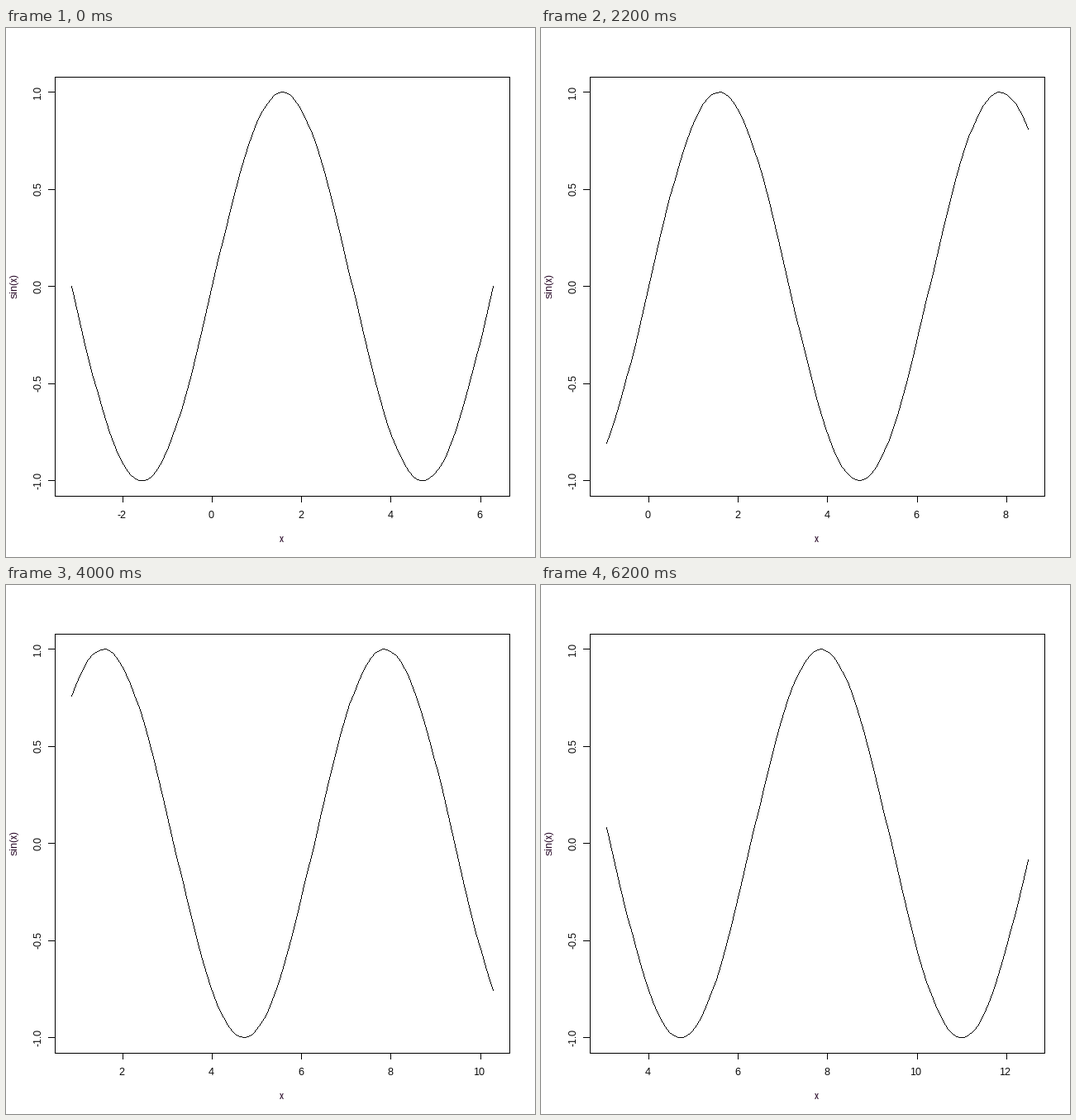
Animation of 640x640 px, one loop 6.3 s. Source, as a matplotlib script:

```python
import math

import numpy as np
import matplotlib.pyplot as plt
from matplotlib.animation import FuncAnimation
from matplotlib.collections import PolyCollection

SIZE = 640
FRAMES = 63
LEFT, RIGHT = 59.04, 609.76
TOP, BOTTOM = 59.04, 566.56
TICK = 7.2
FONT_PT = 8.64
BLACK = "#000000"
TITLE = "#200020"

plt.rcParams.update({
    "font.family": "Liberation Sans",
    "font.size": FONT_PT,
    "text.hinting": "native",
    "text.hinting_factor": 1,
})

fig = plt.figure(figsize=(6.4, 6.4), dpi=100, facecolor="white")
ax = fig.add_axes([0, 0, 1, 1])
ax.set_xlim(0, SIZE)
ax.set_ylim(SIZE, 0)
ax.axis("off")

# Every line is made of whole pixels, so all strokes share one collection.
ink = PolyCollection([], facecolors=BLACK, edgecolors="none", linewidths=0,
                     antialiaseds=False)
ax.add_collection(ink, autolim=False)


def label(text="", x=0, y=0, rotation=0, color=BLACK):
    return ax.text(x, y, text, ha="center", va="baseline", color=color,
                   rotation=rotation, rotation_mode="anchor")


label("x", 333.4, 622, color=TITLE)
label("sin(x)", 13.4, 312.3, rotation=90, color=TITLE)

y_ticks = [-1.0, -0.5, 0.0, 0.5, 1.0]
x_labels = [label() for _ in range(6)]
y_labels = [label(f"{v:.1f}", rotation=90) for v in y_ticks]


def bar(x0, y0, x1, y1):
    """Filled block covering the given pixels, both ends included."""
    x0, y0 = int(x0), int(y0)
    x1, y1 = int(x1) + 1, int(y1) + 1
    return [(x0, y0), (x1, y0), (x1, y1), (x0, y1)]


def trace(px, py):
    """Pixels of a hard-edged polyline through whole-pixel points."""
    points = np.column_stack([px, py]).astype(int)
    parts = []
    for a, b in zip(points[:-1], points[1:]):
        n = max(1, np.abs(b - a).max())
        t = np.arange(n + 1)[:, None] / n
        parts.append(np.floor(a + t * (b - a) + 0.5))
    return np.unique(np.concatenate(parts).astype(int), axis=0)


def padded(lo, hi):
    margin = 0.04 * (hi - lo)
    return lo - margin, hi + margin


BOX = [
    bar(LEFT, TOP, RIGHT, TOP),
    bar(LEFT, BOTTOM, RIGHT, BOTTOM),
    bar(LEFT, TOP, LEFT, BOTTOM),
    bar(RIGHT, TOP, RIGHT, BOTTOM),
]
CORNERS = np.array([(0, 0), (1, 0), (1, 1), (0, 1)])


def draw(frame):
    start = -math.pi + 0.1 * frame
    x = np.linspace(start, start + 3 * math.pi, 101)
    y = np.sin(x)
    x_lo, x_hi = padded(x[0], x[-1])
    y_lo, y_hi = padded(y.min(), y.max())

    def to_px(v):
        return LEFT + (v - x_lo) / (x_hi - x_lo) * (RIGHT - LEFT)

    def to_py(v):
        return BOTTOM - (v - y_lo) / (y_hi - y_lo) * (BOTTOM - TOP)

    quads = list(BOX)
    first = 2 * math.ceil(x_lo / 2)
    for i, text in enumerate(x_labels):
        value = first + 2 * i
        text.set_visible(value <= x_hi)
        if value <= x_hi:
            px = to_px(value)
            quads.append(bar(px, BOTTOM, px, BOTTOM + TICK))
            text.set_text(str(value))
            text.set_position((px - 1, 593))

    for value, text in zip(y_ticks, y_labels):
        py = to_py(value)
        quads.append(bar(LEFT - TICK, py, LEFT, py))
        text.set_position((42.4, py - 0.5))

    curve = trace(to_px(x), to_py(y))
    squares = curve[:, None, :] + CORNERS
    ink.set_verts(np.concatenate([np.array(quads), squares]))
    return [ink, *x_labels, *y_labels]


anim = FuncAnimation(fig, draw, frames=FRAMES, init_func=lambda: draw(0),
                     interval=100, repeat=True, repeat_delay=0, blit=False)
plt.show()
```
